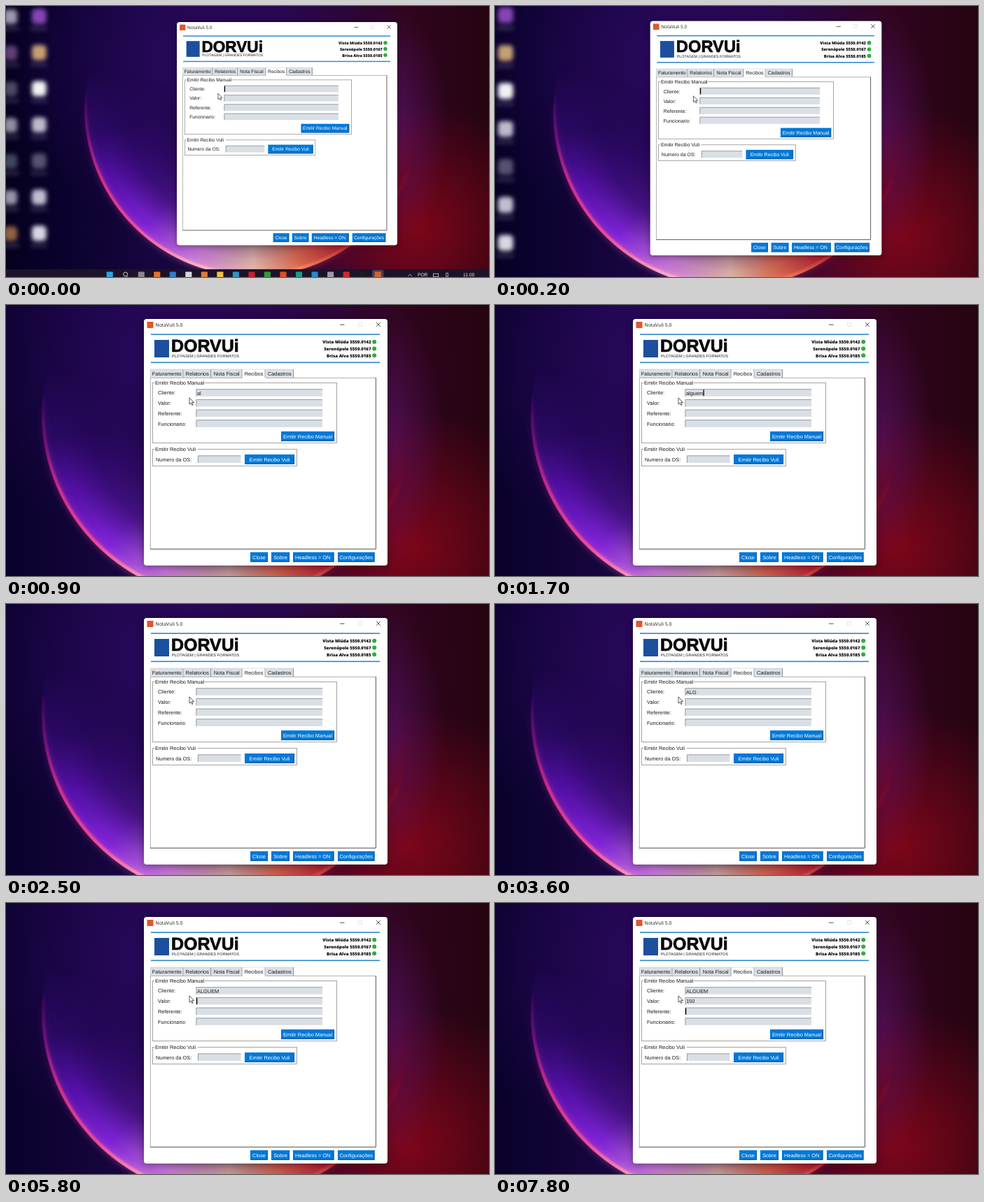
Write an HTML page that moves like this. It is 690 px wide and 388 px high and loops after 8000 ms.

```html
<!DOCTYPE html>
<html lang="pt">
<head>
<meta charset="utf-8">
<style>
  html, body { margin: 0; width: 100%; height: 100%; overflow: hidden; background: #0a0224; }
  #stage { position: relative; width: 100%; height: 100%; overflow: hidden; overflow: clip; contain: strict; }
  #scene { position: absolute; left: 0; top: 0; width: 690px; height: 388px; transform-origin: 692px 52px; }
  #scene > * { position: absolute; }
  #wall {
    left: -96px; top: -8px; width: 790px; height: 444px;
    background:
      radial-gradient(90px 190px at 80% 44%, rgba(100, 22, 125, .6), transparent),
      radial-gradient(220px 200px at 85% 80%, rgba(150, 6, 24, .75), transparent),
      radial-gradient(330px 260px at 42% 20%, rgba(52, 10, 112, .6), transparent),
      linear-gradient(90deg, #04001a, #0a022c 14%, #17053f 32%, #240640 60%, #30051f 82%, #250410);
  }
  .disc { left: 50px; top: -113px; width: 536px; height: 536px; border-radius: 50%; }
  #inner {
    background: conic-gradient(transparent 0 95deg, rgba(120, 8, 30, .5) 125deg, rgba(190, 30, 50, .8) 148deg,
      rgba(240, 120, 80, .9) 164deg, rgba(250, 205, 180, .95) 180deg, rgba(215, 130, 230, .95) 202deg,
      rgba(140, 40, 235, .95) 222deg, rgba(104, 20, 200, .85) 243deg, rgba(66, 14, 140, .5) 262deg, transparent 285deg);
    -webkit-mask: radial-gradient(closest-side, transparent 42%, #0006 74%, #000d 90%, #000 99%, transparent);
    mask: radial-gradient(closest-side, transparent 42%, #0006 74%, #000d 90%, #000 99%, transparent);
  }
  .rim {
    background: conic-gradient(transparent 0 110deg, #a01028 140deg, #ff8a60 165deg, #ffe0c0 182deg,
      #ffa0c0 205deg, #f04c98 225deg, #d0308c 245deg, rgba(140, 24, 130, .7) 260deg, transparent 276deg);
    -webkit-mask: radial-gradient(closest-side, transparent 97.3%, #000 98.6%, #000 99.3%, transparent);
    mask: radial-gradient(closest-side, transparent 97.3%, #000 98.6%, #000 99.3%, transparent);
  }
  .halo { filter: blur(5px); opacity: .6; }
  svg { left: 0; top: 0; overflow: visible; }
  text { font: 7.4px "Liberation Sans", Arial, sans-serif; text-rendering: geometricPrecision; white-space: pre; }
  .title { font: 6.9px "Open Sans", sans-serif; }
  .brand { font-weight: bold; font-size: 25px; stroke: #0a0a0a; stroke-width: .7px; }
  .sub { font-size: 5.62px; }
  .phone { font: 800 6.1px "Open Sans", sans-serif; }
</style>
</head>
<body>
<div id="stage">
  <div id="scene">
    <div id="wall"></div>
    <div id="inner" class="disc"></div>
    <div class="disc halo"><div class="rim" style="width:100%;height:100%"></div></div>
    <div class="disc rim"></div>
    <svg id="ui" width="690" height="388"></svg>
  </div>
</div>
<script>
const BLUE = '#0078d7', INK = '#1c1c1c', LOOP = 8000, STEP = 100;
const rect = (x, y, w, h, fill, extra = '') =>
  `<rect x="${x}" y="${y}" width="${w}" height="${h}" fill="${fill}" ${extra}/>`;
const path = (d, stroke, width = .8) => `<path d="${d}" fill="none" stroke="${stroke}" stroke-width="${width}"/>`;
const label = (s, x, y, extra = '', fill = INK) => `<text x="${x}" y="${y + 2.65}" fill="${fill}" ${extra}>${s}</text>`;
const centered = 'text-anchor="middle"';

const button = (s, x, y, w) =>
  rect(x, y, w, 14, BLUE) +
  path(`M${x} ${y + 13.6}h${w - .4}v-13.6`, '#0a4f8c') +
  label(s, x + w / 2, y + 7, centered, '#fff');
const entry = (x, y, w) =>
  rect(x, y, w, 10.5, '#d9dfe5') + path(`M${x + .4} ${y + 10.5}v-10.1h${w - .4}`, '#848a90');
const group = (s, x, y, w, h, labelWidth) =>
  rect(x + .5, y + .5, w, h, 'none', 'stroke="#8c8c8c" stroke-width=".8"') +
  rect(x + 3, y - 3, labelWidth, 8, '#fff') + label(s, x + 4, y + .5);
const tab = (s, x, w, active) =>
  rect(x, active ? 91 : 92, w, active ? 14 : 12, active ? '#fff' : '#dae0e6') +
  path(`M${x + .3} 104V92h${w - .6}`, '#c6ccd2', .6) + path(`M${x + w - .4} 92v12`, '#777') +
  label(s, x + w / 2, 98, centered);

function desktop() {
  const near = ['#8a4ab8', '#d0a878', '#fff', '#c8c4d4', '#5a5674', '#ccc8da', '#e4e4ec'];
  const far = ['#b8b0c8', '#6d4a86', '#5a5470', '#a9a4b8', '#4a5268', '#b0acc0', '#a8744a'];
  let out = '<g style="filter:blur(3.6px)">';
  near.forEach((c, i) => {
    const y = 11 + 57.2 * i;
    out += rect(-32, y - 12, 23, 24, c, 'rx="6" opacity=".95"') + rect(-34, y + 17, 26, 5, '#8b84a0', 'opacity=".35"');
    out += rect(-76, y - 11, 21, 23, far[i], 'rx="6" opacity=".85"') + rect(-78, y + 17, 26, 5, '#8b84a0', 'opacity=".35"');
  });
  return out + '</g>';
}

function taskbar() {
  const apps = ['#2aa5ea', '', '#888', '#e8702a', '#2c7fd0', '#d5d9e0', '#e07a30', '#f0c040', '#2c94c0',
    '#c8202c', '#2f9a40', '#e84a24', '#1a9a8a', '#2389d8', '#9a9aa4', '#d02a2a', '#1b1b1f', '#d8602c'];
  let out = rect(-96, 411, 790, 26, '#1d1328');
  apps.forEach((c, i) => {
    const x = 91 + 24.9 * i;
    if (i === 17) out += rect(x - 9, 412, 18, 18, '#4a4054', 'rx="2"');
    out += c ? rect(x - 5, 415, 10, 10, c, 'rx="1"')
      : `<circle cx="${x}" cy="419" r="3.3" fill="none" stroke="#ddd"/>` + path(`M${x + 2} 422l3 3`, '#ddd', 1);
  });
  return out + path('M562 422l3-3 3 3', '#eee') + label('POR', 585, 420, centered, '#eee') +
    rect(602, 418, 8, 5, 'none', 'stroke="#ddd" stroke-width=".8"') + path('M622 417h3v6h-3z', '#ddd') +
    label('11:00', 658, 420, centered, '#eee');
}

function appWindow() {
  const rows = ['Cliente:', 'Valor:', 'Referente:', 'Funcionario:'];
  const phones = ['Vista Miúda 5550.0142', 'Serenópole 5550.0167', 'Brisa Alva 5550.0185'];
  let out = rect(196, 20, 350, 355, '#000', 'rx="5" opacity=".3" style="filter:blur(4px)"') +
    rect(197, 20, 348, 353, '#fff', 'rx="4"') +
    rect(201.5, 24, 9, 9, '#e0562e') + label('NotaVuli 5.0', 213.5, 28, 'class="title"') +
    path('M477 28.2h6.5M529 25l5.8 5.8m0-5.8l-5.8 5.8', '#222') +
    rect(503.5, 25.5, 5, 5, 'none', 'stroke="#ddd" stroke-width=".7"') +
    rect(207, 41.3, 327, 1.6, '#2c86cc') + rect(207, 81.5, 327, 1.6, '#2c86cc') +
    rect(212, 50, 21, 25, '#1c4f9e') +
    label('DORVUi', 236, 64.6, 'class="brand"', '#0a0a0a') +
    label('PLOTAGEM | GRANDES FORMATOS', 237, 72, 'class="sub"');
  phones.forEach((s, i) => {
    const y = 53 + 9.8 * i;
    out += label(s, 521.5, y - .5, 'class="phone" text-anchor="end"', '#0a0a0a') +
      `<circle cx="526.2" cy="${y - .3}" r="3" fill="#2fae3c"/>`;
  });
  out += path('M206.3 349V104.4h321.7', '#9a9a9a') + path('M206 349.4h322.4V104', '#555', 1) +
    tab('Faturamento', 206, 47.5) + tab('Relatorios', 253.5, 39.5) + tab('Nota Fiscal', 293, 44.5) +
    tab('Recibos', 337.5, 33, true) + tab('Cadastros', 370.5, 40.5) +
    group('Emitir Recibo Manual', 209, 111, 263, 86, 72) +
    group('Emitir Recibo Vuli', 209, 206, 206, 24, 62);
  rows.forEach((s, i) => {
    const y = 120.3 + 14.7 * i;
    out += label(s, 217, y + 5.5) + entry(271.5, y, 180.5) + `<text class="value" x="273" y="${y + 8.2}" fill="${INK}"/>`;
  });
  return out + button('Emitir Recibo Manual', 393, 181, 76) +
    label('Numero da OS:', 214, 221) + entry(274, 215.5, 61.5) + button('Emitir Recibo Vuli', 341, 214, 71) +
    button('Close', 349, 354, 25) + button('Sobre', 379, 354, 26) +
    button('Headless = ON ', 410, 354, 58.5) + button('Configurações', 474, 354, 52.5) +
    rect(0, 0, 1.3, 9, '#000', 'id="caret"') +
    '<path d="M262 132.8v9.4l2.2-2 1.5 3.4 1.5-.7-1.5-3.3h2.9z" fill="#fff" stroke="#111" stroke-width=".7"/>';
}

const ui = document.getElementById('ui');
ui.innerHTML = desktop() + taskbar() + appWindow();
const scene = document.getElementById('scene');
const caret = document.getElementById('caret');
const values = [...document.querySelectorAll('.value')];

const typed = (s, start, gap, t) => s.slice(0, Math.max(0, Math.floor((t - start) / gap) + 1));
const erased = (s, start, gap, t) => s.slice(0, s.length - typed(s, start, gap, t).length);

// Typed in lower case, erased, then typed again in capitals.
function client(t) {
  if (t < 1800) return typed('alguem', 700, 200, t);
  return t < 2800 ? erased('alguem', 1900, 100, t) : typed('ALGUEM', 3000, 250, t);
}

const easeInOutCubic = u => u < .5 ? 4 * u ** 3 : 1 - (2 - 2 * u) ** 3 / 2;
const focusTimes = [-75, 5600, 7600];
const BLINK = 550, BLINK_ON = 367;

function draw(t) {
  const zoom = easeInOutCubic(Math.min(1, (t + 365) / 1089));
  scene.style.transform = `scale(${.888 + .112 * zoom})`;

  const texts = [client(t), typed('150', 6900, 200, t), '', ''];
  values.forEach((el, i) => { el.textContent = texts[i]; });

  const field = focusTimes.filter(time => time <= t).length - 1;
  caret.setAttribute('x', 272 + (texts[field] ? values[field].getComputedTextLength() + 1.2 : 0));
  caret.setAttribute('y', 121.2 + 14.7 * field);
  caret.style.visibility = (t - focusTimes[field]) % BLINK < BLINK_ON ? 'visible' : 'hidden';
}

const start = performance.now();
function tick() {
  const t = (performance.now() - start) % LOOP;
  draw(Math.floor(t / STEP) * STEP);
  requestAnimationFrame(tick);
}
tick();
</script>
</body>
</html>
```
